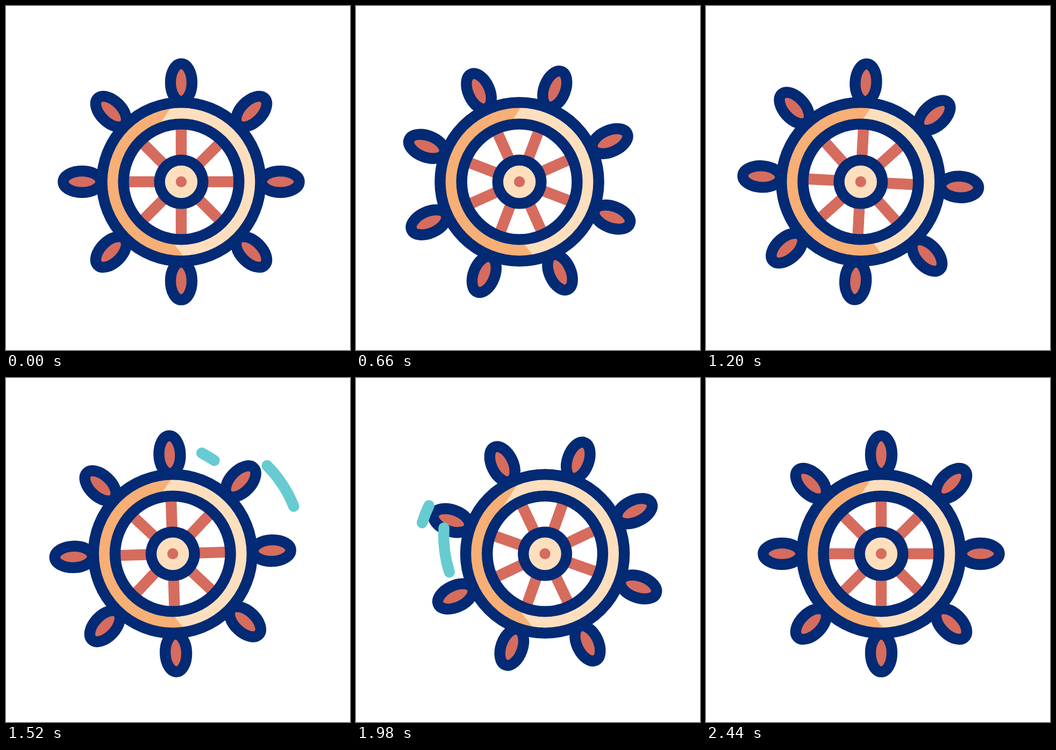
These frames come from a looping animation (640 px wide and 640 px high, 3.22 s). An HTML page with a canvas:

```html
<!DOCTYPE html>
<html lang="en">
<head>
<meta charset="utf-8">
<title>Ship's wheel</title>
<style>
  html, body { margin: 0; width: 100%; height: 100%; overflow: hidden; background: #fff; }
  canvas { display: block; width: 100vw; height: 100vh; object-fit: contain; }
</style>
</head>
<body>
<canvas id="stage" width="640" height="640"></canvas>
<script>
const ctx = document.getElementById('stage').getContext('2d');

const LOOP = 3220, STEP = 20, CENTER_Y = 327, LINE = 20.4;
const NAVY = '#032a74', CORAL = '#d66c5e', CREAM = '#fddfbe', ORANGE = '#f7af75', TEAL = '#67cbd1';
const RAD = Math.PI / 180;

// The wheel rolls left, spins to the right, then settles back.
const poses = [
  { time: 0, x: 326, turn: 0 },
  { time: 1200, x: 287.8, turn: -42 },
  { time: 2000, x: 351.7, turn: 200 },
  { time: 2440, x: 326, turn: 180 }
];

// Arcs that turn with the wheel; a window of WINDOW degrees slides along each.
const WINDOW = 23;
const streaks = [
  { axis: 31, offset: 14.5, radius: 227.3, from: -29.2, sweep: 94.4, begin: 1280, duration: 840 },
  { axis: 29.5, offset: -52.4, radius: 228, from: -45.6, sweep: 90, begin: 1400, duration: 800 }
];

const clamp = (v, low, high) => Math.min(high, Math.max(low, v));
const mix = (a, b, u) => a + (b - a) * u;

function ease(t, begin, end) {
  const u = clamp((t - begin) / (end - begin), 0, 1);
  return u * u * (3 - 2 * u);
}

function poseAt(t) {
  const i = Math.max(1, poses.findIndex(p => p.time > t));
  const next = t < poses.at(-1).time ? i : poses.length - 1;
  const a = poses[next - 1], b = poses[next];
  const u = ease(t, a.time, b.time);
  return { x: mix(a.x, b.x, u), turn: mix(a.turn, b.turn, u) };
}

function ring(x, radius, color, width = LINE) {
  ctx.beginPath();
  ctx.arc(x, CENTER_Y, radius, 0, 2 * Math.PI);
  ctx.strokeStyle = color;
  ctx.lineWidth = width;
  ctx.stroke();
}

function disc(x, radius, color) {
  ctx.beginPath();
  ctx.arc(x, CENTER_Y, radius, 0, 2 * Math.PI);
  ctx.fillStyle = color;
  ctx.fill();
}

function drawSpokes(x, turn) {
  ctx.save();
  ctx.translate(x, CENTER_Y);
  ctx.rotate(turn * RAD);
  ctx.fillStyle = CORAL;
  ctx.strokeStyle = NAVY;
  ctx.lineWidth = LINE;
  for (let i = 0; i < 8; i++) {
    ctx.fillRect(-LINE / 2, -100, LINE, 60);
    ctx.beginPath();
    ctx.ellipse(0, -184.6, 20, 35, 0, 0, 2 * Math.PI);
    ctx.fill();
    ctx.stroke();
    ctx.rotate(45 * RAD);
  }
  ctx.restore();
}

// The shading edge stays fixed on the stage while the rim moves past it.
function clipToShade() {
  ctx.beginPath();
  ctx.moveTo(312, 181);
  ctx.lineTo(270, 244);
  ctx.lineTo(304, 432);
  ctx.lineTo(334, 470);
  ctx.lineTo(0, 470);
  ctx.lineTo(0, 181);
  ctx.clip();
}

function drawRim(x) {
  ring(x, 127.5, CREAM, 24);
  ctx.save();
  clipToShade();
  ring(x, 127.5, ORANGE, 24);
  ctx.restore();
  ring(x, 147.6, NAVY);
  ring(x, 107.4, NAVY);
}

function drawHub(x) {
  disc(x, 50.5, NAVY);
  disc(x, 30.2, CREAM);
  disc(x, 10.2, CORAL);
}

function drawStreak({ axis, offset, radius, from, sweep, begin, duration }, x, turn, t) {
  const travel = (sweep + WINDOW) * ease(t, begin, begin + duration);
  const head = clamp(travel, 0, sweep);
  const tail = clamp(travel - WINDOW, 0, sweep);
  if (head - tail < 0.01) return;
  ctx.save();
  ctx.translate(x, CENTER_Y);
  ctx.rotate((turn + axis - 90) * RAD);
  ctx.beginPath();
  ctx.arc(offset, 0, radius, (from + tail) * RAD, (from + head) * RAD);
  ctx.strokeStyle = TEAL;
  ctx.lineWidth = LINE;
  ctx.lineCap = 'round';
  ctx.stroke();
  ctx.restore();
}

function draw(t) {
  const { x, turn } = poseAt(t);
  ctx.fillStyle = '#fff';
  ctx.fillRect(0, 0, 640, 640);
  drawSpokes(x, turn);
  drawRim(x);
  drawHub(x);
  streaks.forEach(s => drawStreak(s, x, turn, t));
}

const start = performance.now();
function tick() {
  const t = (performance.now() - start) % LOOP;
  draw(Math.floor(t / STEP) * STEP);
  requestAnimationFrame(tick);
}
tick();
</script>
</body>
</html>
```
